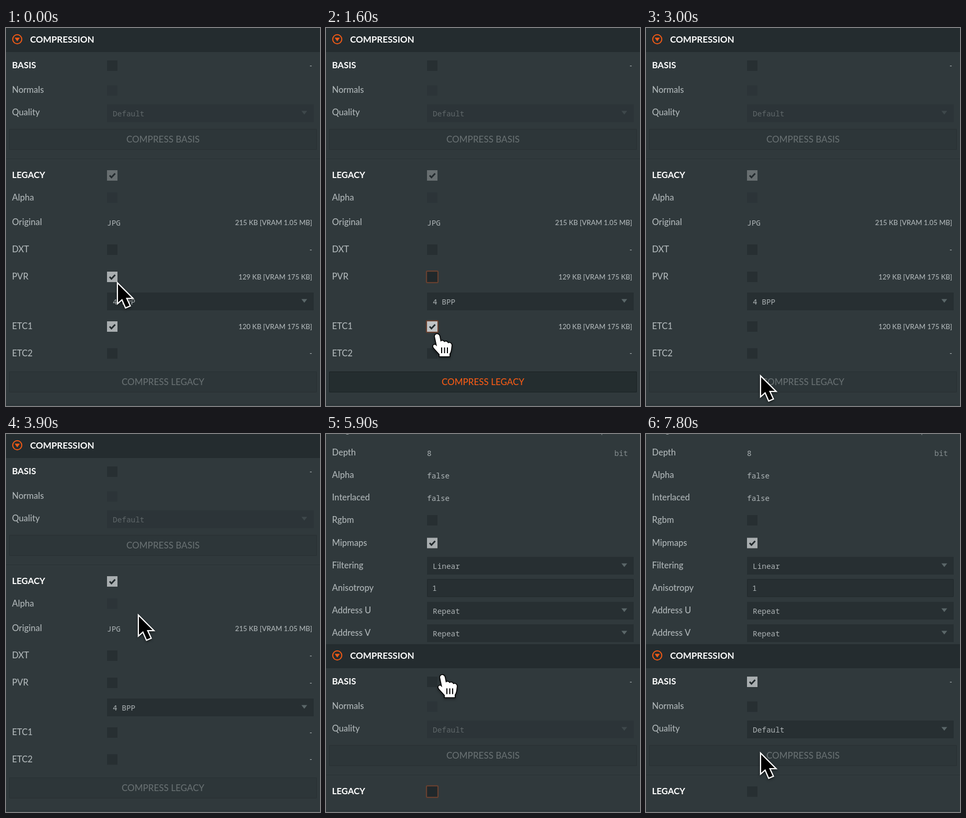
Recreate the animation shown at these times as an HTML page with a canvas. Size 600 px wide and 723 px high, loop 8000 ms.

```html
<!DOCTYPE html>
<html lang="en">
<head>
<meta charset="utf-8">
<title>Texture compression panel</title>
<style>
html, body { margin: 0; width: 100%; height: 100%; overflow: hidden; background: #30393c; }
canvas { display: block; }
</style>
</head>
<body>
<canvas width="600" height="723"></canvas>
<script>
const ctx = document.querySelector('canvas').getContext('2d');
const LOOP = 8000, STEP = 100, SHIFT = 402, COLLAPSE = 4700;
const BG = '#30393c', HEADER = '#242c2f', FIELD = '#272f32', DEEP = '#20282b';
const LABEL = '#aeb5b7', WHITE = '#ffffff', ORANGE = '#f25a16', LIGHT = '#a9aeb0';
const SANS = 'Lato, "Open Sans", sans-serif', MONO = '14.4px "Noto Sans Mono", monospace';
const NORMAL = '500 16.5px ' + SANS, BOLD = 'bold 16.8px ' + SANS;
const SMALL = '500 13.2px ' + SANS, BUTTON = '500 17px ' + SANS;

// time, x, y of the pointer
const PATH = [
  [0, 212, 486], [1000, 212, 486], [1600, 202, 575], [1900, 202, 575], [2200, 218, 664],
  [3500, 218, 664], [3900, 252, 345], [4400, 212, 288], [5200, 212, 288],
  [6100, 212, 474], [6200, 212, 474], [6700, 218, 609], [LOOP, 218, 609]
];
const POINTERS = [
  [0, 'arrow'], [200, 'hand'], [2700, 'arrow'], [4500, 'hand'],
  [COLLAPSE, 'beam'], [5600, 'hand'], [7600, 'arrow']
];
const ARROW = new Path2D('M2 4V39L10 32L17 48L24 45L17 30H28Z');
const HAND = new Path2D('M5 5C5-1 13-1 14 5L16 15C18 12 22 13 23 16C25 14 29 14 30 18C33 16 37 18 37 22' +
  'L36 30Q35 36 33 38V43H14V39L4 28C0 24 2 20 6 21L9 24Z');
const FINGERS = new Path2D('M18 26V37M23.5 26V37M29 26V37');
const BEAM = new Path2D('M-10-21Q0-21 0-14Q0-21 10-21M0-14V14M-10 21Q0 21 0 14Q0 21 10 21M-5 0H5');

let t = 0;

const clamp = v => Math.max(0, Math.min(1, v));
const ramp = (start, length = 200) => 1 - (1 - clamp((t - start) / length)) ** 2;
const during = (a, b) => ramp(a) - ramp(b);

function mix(a, b, p) {
  const part = (c, i) => parseInt(c.slice(i, i + 2), 16);
  return '#' + [1, 3, 5].map(i =>
    Math.round(part(a, i) + (part(b, i) - part(a, i)) * p).toString(16).padStart(2, '0')).join('');
}

function faded(alpha, draw) {
  ctx.save();
  ctx.globalAlpha *= alpha;
  draw();
  ctx.restore();
}

function box(x, y, w, h, color) {
  ctx.fillStyle = color;
  ctx.fillRect(x, y, w, h);
}

function frame(x, y, w, h, color, width = 1.5) {
  ctx.strokeStyle = color;
  ctx.lineWidth = width;
  ctx.beginPath();
  ctx.roundRect(x, y, w, h, 1.5);
  ctx.stroke();
}

function line(points, color, width) {
  ctx.strokeStyle = color;
  ctx.lineWidth = width;
  ctx.beginPath();
  points.forEach(([x, y]) => ctx.lineTo(x, y));
  ctx.stroke();
}

function text(s, x, y, font = NORMAL, color = LABEL, align = 'left') {
  ctx.font = font;
  ctx.fillStyle = color;
  ctx.textAlign = align;
  ctx.fillText(s, x, y);
}

function down(x, y, w, h, color) {
  ctx.fillStyle = color;
  ctx.beginPath();
  ctx.moveTo(x - w / 2, y - h / 2);
  ctx.lineTo(x + w / 2, y - h / 2);
  ctx.lineTo(x, y + h / 2);
  ctx.fill();
}

const label = (s, y) => text(s, 11.5, y + 6);
const title = (s, y) => text(s, 11.5, y + 6, BOLD, WHITE);
const value = (s, y) => text(s, 193, y + 6, MONO);
const size = (s, y) => text(s, 585, y + 5.5, SMALL, LABEL, 'right');

function glow(x, y, w, h, amount) {
  faded(amount, () => {
    frame(x, y, w, h, '#f25a1618', 3);
    frame(x, y, w, h, '#f25a1648');
  });
}

function check(y, on = 0, focus = 0, alpha = 1) {
  const lit = mix(LIGHT, '#bfc3c5', focus);
  faded(on ? 1 : alpha, () => box(193, y - 10, 20, 20, mix(mix(FIELD, DEEP, focus), lit, on * alpha)));
  faded(on, () => line([[198, y], [201.5, y + 3.8], [208.5, y - 3.8]], '#222a2d', 3));
  glow(192, y - 11, 22, 22, focus);
}

function select(s, y, alpha = 1, hover = 0) {
  faded(alpha, () => {
    box(193, y - 17, 395, 34, mix(FIELD, DEEP, hover));
    text(s, 204, y + 5.5, MONO, mix('#adb3b5', WHITE, hover));
    down(570, y - 1, 11, 7, mix('#5b6769', LIGHT, hover));
  });
}

function button(s, y, enabled, hover) {
  box(6, y - 20, 588, 40, mix('#2d3639', '#242d2f', enabled));
  frame(6.5, y - 19.5, 587, 39, mix('#283033', '#1b2224', enabled), 1);
  glow(5.5, y - 20.5, 589, 41, hover);
  text(s, 300, y + 6, BUTTON, mix(mix('#666e70', ORANGE, enabled), WHITE, hover), 'center');
}

function rule(y) {
  box(0, y, 600, 1, '#273033');
  box(0, y + 1, 600, 1, '#343d40');
}

function anisotropy(y) {
  const hover = during(COLLAPSE, 5500);
  label('Anisotropy', y - 1);
  box(193, y - 17, 395, 34, mix(FIELD, '#212a2c', hover));
  frame(193.5, y - 16.5, 394, 33, '#20282b', 1);
  glow(192.5, y - 17.5, 397, 36, hover);
  text('1', 203, y + 5.5, MONO);
  faded(hover, () => {
    line([[563, y - 4], [563, y - 9], [580, y - 9], [580, y - 4]], WHITE, 2);
    line([[563, y + 4], [563, y + 9], [580, y + 9], [580, y + 4]], WHITE, 2);
    line([[563, y], [580, y]], WHITE, 2);
    line([[566, y - 4], [562, y], [566, y + 4]], WHITE, 2);
    line([[577, y - 4], [581, y], [577, y + 4]], WHITE, 2);
  });
}

function textureRows() {
  label('Height', -8);
  text('pixels', 577, -2, MONO, '#858d8f', 'right');
  label('Depth', 35);
  value('8', 36);
  text('bit', 577, 42, MONO, '#858d8f', 'right');
  label('Alpha', 78);
  value('false', 79);
  label('Interlaced', 121);
  value('false', 122);
  label('Rgbm', 164);
  check(165);
  label('Mipmaps', 207.5);
  check(208.5, 1);
  label('Filtering', 250.5);
  select('Linear', 252);
  anisotropy(294.5);
  label('Address U', 337);
  select('Repeat', 338);
  label('Address V', 380);
  select('Repeat', 381);
}

function basisRows() {
  const enabled = ramp(6200);
  box(0, 0, 600, 46, HEADER);
  ctx.strokeStyle = ORANGE;
  ctx.lineWidth = 2;
  ctx.beginPath();
  ctx.arc(21.5, 21.5, 8.7, 0, 7);
  ctx.stroke();
  down(21.5, 22, 10, 7, ORANGE);
  text('COMPRESSION', 46, 28, 'bold 17px ' + SANS, WHITE);
  title('BASIS', 71);
  check(72, enabled, during(6000, 7600));
  size('-', 71);
  label('Normals', 118);
  check(119.5, 0, 0, 0.4 + 0.6 * enabled);
  label('Quality', 161);
  select('Default', 163, 0.4 + 0.6 * enabled, during(6400, 6650));
  button('COMPRESS BASIS', 213, during(6200, 7600), during(6700, 7600));
  rule(250);
  title('LEGACY', 281);
  check(282, 1 - ramp(COLLAPSE, 300), during(4500, 6200), t < 3100 ? 0.5 : 1);
}

function legacyRows() {
  const done = t >= 3100;
  label('Alpha', 324);
  check(324.5, 0, 0, 0.4);
  label('Original', 371);
  value('JPG', 372);
  size('215 KB [VRAM 1.05 MB]', 371);
  label('DXT', 423);
  check(424);
  size('-', 423);
  label('PVR', 475);
  check(476, 1 - ramp(400), during(200, 1900));
  size(done ? '-' : '129 KB [VRAM 175 KB]', 475);
  select('4 BPP', 523, 1, during(1200, 1400));
  label('ETC1', 570);
  check(571, 1 - ramp(1900), during(1400, 2700));
  size(done ? '-' : '120 KB [VRAM 175 KB]', 570);
  label('ETC2', 621.5);
  check(622.5);
  size('-', 621.5);
  button('COMPRESS LEGACY', 677, during(400, 2700), during(2000, 2700));
}

function pointer() {
  const i = PATH.findIndex(k => k[0] > t);
  const [t0, x0, y0] = PATH[i - 1], [t1, x1, y1] = PATH[i];
  const p = (t - t0) / (t1 - t0), e = p * p * (3 - 2 * p);
  const kind = POINTERS.filter(k => k[0] <= t).pop()[1];
  const outline = (path, color, width) => {
    ctx.strokeStyle = color;
    ctx.lineWidth = width;
    ctx.stroke(path);
  };
  ctx.save();
  ctx.translate(x0 + (x1 - x0) * e, y0 + (y1 - y0) * e);
  ctx.shadowColor = '#0008';
  ctx.shadowBlur = 4;
  ctx.shadowOffsetY = 2;
  if (kind === 'arrow') {
    outline(ARROW, WHITE, 4.5);
    ctx.shadowColor = 'transparent';
    ctx.fillStyle = '#000';
    ctx.fill(ARROW);
  } else if (kind === 'hand') {
    ctx.translate(1, 10);
    outline(HAND, '#000', 3);
    ctx.shadowColor = 'transparent';
    ctx.fillStyle = WHITE;
    ctx.fill(HAND);
    outline(FINGERS, '#000', 2);
  } else {
    ctx.translate(1, 14);
    ctx.lineCap = 'round';
    outline(BEAM, WHITE, 7);
    ctx.shadowColor = 'transparent';
    outline(BEAM, '#000', 3);
  }
  ctx.restore();
}

function draw(now) {
  t = Math.floor(now % LOOP / STEP) * STEP;
  const collapsed = t >= COLLAPSE;
  box(0, 0, 600, 723, BG);
  if (collapsed) textureRows();
  ctx.save();
  if (collapsed) ctx.translate(0, SHIFT);
  basisRows();
  if (!collapsed) legacyRows();
  ctx.restore();
  rule(720);
  pointer();
}

const start = performance.now();
function tick() {
  draw(performance.now() - start);
  requestAnimationFrame(tick);
}
tick();
</script>
</body>
</html>
```
